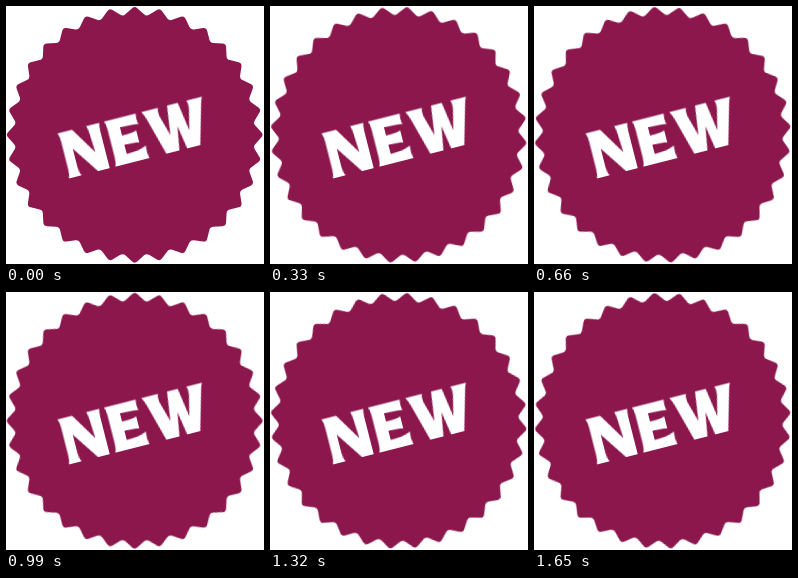
Animation, 258 px wide and 258 px high, one loop 1980 ms. Source, as an HTML page:

```html
<!DOCTYPE html>
<html lang="en">
<head>
<meta charset="utf-8">
<title>New badge</title>
<style>
  html, body { margin: 0; width: 100%; height: 100%; overflow: hidden; background: #fff; }
  svg { display: block; width: 100%; height: 100%; }
  #seal {
    fill: #8c174d;
    transform-origin: 128.7px 128.8px;
    animation: turn 1980ms steps(6, end) infinite;
  }
  /* two teeth per loop, a third of a tooth per step */
  @keyframes turn { to { transform: rotate(22.5deg); } }
  #word { fill: #fff; }
</style>
</head>
<body>
<svg viewBox="0 0 258 258" role="img" aria-label="NEW">
  <path id="seal"/>
  <!-- flared capitals on a slanted baseline -->
  <g id="word" transform="translate(63 172.5) rotate(-14.3)">
    <path d="M0 -46.5H15L32 -19L31 -38Q31 -43 29.500 -46.500H43Q42 -43 42 -38V0H30L11 -28V-9Q11 -4 13 0H0Q1.500 -4 1.500 -9V-37Q1.500 -43 0 -46.500Z"/>
    <path d="M48 -46.500H80.500Q79.500 -41 80.500 -35.500Q75 -37 62 -37V-28.500Q73 -28.500 77 -30V-17.500Q73 -19 62 -19V-9.500Q76 -9.500 82.500 -13Q81.500 -6 83 0H48Q49.500 -4 49.500 -9V-38Q49.500 -43 48 -46.500Z"/>
    <path d="M86.500 -46.500H103.500Q102 -43 103 -38L109 -17L113 -46.500H124L128.500 -17L133.500 -38Q134.500 -43 133 -46.500H149Q147 -43 146 -38L135.500 0H122L118 -24L114 0H100.500L90 -38Q88.500 -43 86.500 -46.500Z"/>
  </g>
</svg>
<script>
  const teeth = 32, tip = 129, valley = 119, cx = 128.7, cy = 128.8;

  const corner = i => {
    const a = i * Math.PI / teeth - Math.PI / 2;
    const r = i % 2 ? valley : tip;
    return [cx + r * Math.cos(a), cy + r * Math.sin(a)];
  };
  const mix = (p, q, t) => p.map((v, k) => v + (q[k] - v) * t);
  const text = p => p.map(v => v.toFixed(2)).join(" ");

  // straight flanks with rounded tips and valleys
  let d = "";
  for (let i = 0; i < teeth * 2; i++) {
    const p = corner(i), t = i % 2 ? 0.2 : 0.22;
    d += (i ? "L" : "M") + text(mix(p, corner(i + teeth * 2 - 1), t));
    d += "Q" + text(p) + " " + text(mix(p, corner(i + 1), t));
  }
  document.getElementById("seal").setAttribute("d", d + "Z");
</script>
</body>
</html>
```
